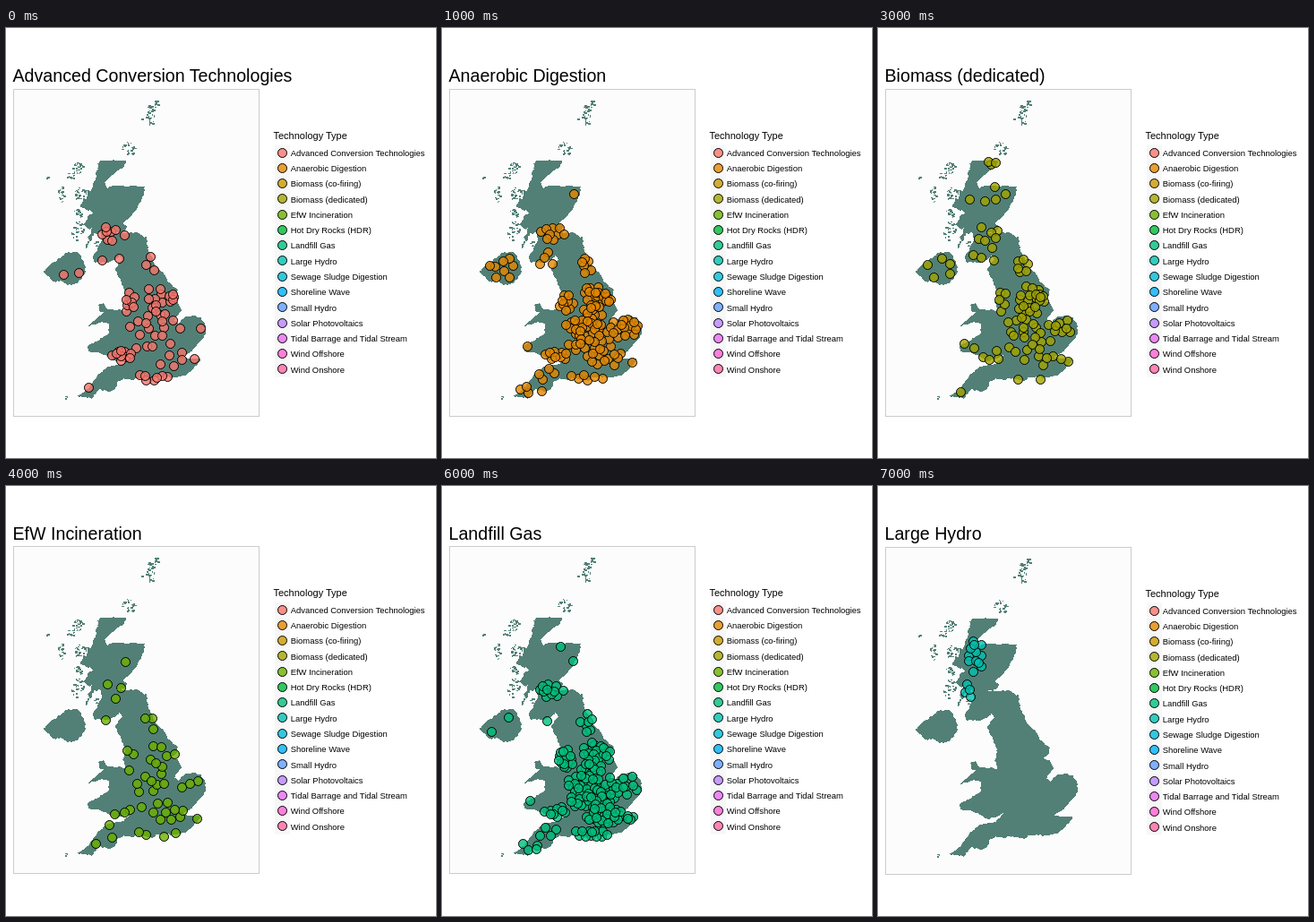
Recreate the animation shown at these times as an HTML page. Size 480 by 480 pixels, loop 8000 ms.

```html
<!DOCTYPE html>
<html lang="en">
<head>
<meta charset="utf-8">
<style>
  html, body { margin: 0; width: 100%; height: 100%; overflow: hidden; background: #fff; }
  svg { display: block; width: 480px; height: 480px; font-family: "Liberation Sans", Arial, sans-serif; }
  .land { fill: #528076; shape-rendering: crispEdges; }
  .dots circle { stroke: #000; stroke-width: 1; fill-opacity: .8; }
</style>
</head>
<body>
<svg viewBox="0 0 480 480">
  <text id="title" x="7.5" y="60" font-size="19.65"></text>
  <g id="plot">
    <rect x="8.5" y="68.5" width="274" height="365" fill="#fcfcfc" stroke="#ccc"/>
    <g id="land" class="land"></g>
    <g id="sites"></g>
    <text x="298.5" y="124" font-size="11">Technology Type</text>
    <g id="legend" class="dots" font-size="9.45"></g>
  </g>
</svg>
<script>
const $ = id => document.getElementById(id);
const STEP = 1000;

const types = [
  ['Advanced Conversion Technologies', '#F8766D'], ['Anaerobic Digestion', '#E58700'],
  ['Biomass (co-firing)', '#C99800'], ['Biomass (dedicated)', '#A3A500'],
  ['EfW Incineration', '#6BB100'], ['Hot Dry Rocks (HDR)', '#00BA38'],
  ['Landfill Gas', '#00BF7D'], ['Large Hydro', '#00C0AF'],
  ['Sewage Sludge Digestion', '#00BCD8'], ['Shoreline Wave', '#00B0F6'],
  ['Small Hydro', '#619CFF'], ['Solar Photovoltaics', '#B983FF'],
  ['Tidal Barrage and Tidal Stream', '#E76BF3'], ['Wind Offshore', '#FD61D1'],
  ['Wind Onshore', '#FF67A4']
];

let seed = 7;
const random = () => (seed = seed * 16807 % 2147483647) / 2147483647;
const spread = r => (random() * 2 - 1) * r;

function inEllipse([cx, cy, rx, ry]) {
  const angle = random() * 2 * Math.PI, r = Math.sqrt(random());
  return [Math.round(cx + rx * r * Math.cos(angle)), Math.round(cy + ry * r * Math.sin(angle))];
}

function add(parent, tag, attrs, text = '') {
  const el = document.createElementNS('http://www.w3.org/2000/svg', tag);
  for (const key in attrs) el.setAttribute(key, attrs[key]);
  el.textContent = text;
  return parent.appendChild(el);
}

// A coast joins a few key points with short, roughened steps.
function coast(rough, text) {
  const points = text.split(/\s+/).map(p => p.split(',').map(Number)), out = [];
  points.forEach(([x, y], i) => {
    const [u, v] = points[(i + 1) % points.length];
    const n = Math.max(1, Math.round(Math.hypot(u - x, v - y) / 2));
    for (let k = 0; k < n; k++)
      out.push([x + (u - x) * k / n + spread(rough), y + (v - y) * k / n + spread(rough)].map(Math.round));
  });
  add($('land'), 'polygon', { points: out.join(' ') });
}

// An archipelago is a scatter of tiny blocks.
function isles(count, ...ellipse) {
  for (let i = 0; i < count; i++) {
    const [x, y] = inEllipse(ellipse);
    add($('land'), 'rect', { x, y, width: 1 + Math.floor(random() * 3), height: 1 + Math.floor(random() * 2) });
  }
}

// Scotland, then its ragged west
coast(.6, `104,148 134,148 132,154 121,162 110,172 112,179 119,176 155,177 154,186 146,202
  136,213 130,218 135,222 131,227 122,229 144,228 152,231 158,238 158,262 131,262 127,253
  122,259 114,262 98,261 97,255 103,244 107,237 101,215 101,170`);
coast(2, '104,150 100,166 92,184 82,200 97,205 86,221 95,224 89,245 97,232 106,225 110,180');

// England and Wales
coast(.7, `156,232 158,245 166,265 176,274 181,283 191,292 190,300 184,304 192,306 196,315
  188,326 193,330 199,323 209,321 218,324 223,333 222,343 211,357 197,368 217,369 215,375
  202,387 192,390 169,390 163,394 150,391 139,393 131,391 125,395 122,403 116,406 104,403
  96,413 79,411 92,402 103,387 113,378 131,375 140,365 130,370 121,372 107,363 93,361
  90,355 106,347 115,341 114,329 107,328 91,333 108,318 115,314 133,315 131,307 133,292
  129,284 122,270 126,263 130,256`);
coast(.8, '103,309 109,308 113,314 110,318 104,317');

// Northern Ireland
coast(.9, '42,273 47,266 56,260 66,251 81,251 88,265 89,273 80,284 69,287 61,282 54,284');

isles(26, 83, 185, 7, 7);
isles(20, 80, 207, 5, 5);
isles(28, 79, 226, 7, 11);
isles(24, 80, 156, 6, 6);
isles(14, 72, 165, 5, 5);
isles(20, 61, 186, 4, 10);
isles(6, 100, 240, 2, 4);
isles(26, 137, 133, 8, 9);
isles(30, 161, 96, 5, 12);
isles(10, 167, 84, 2, 4);
isles(3, 66, 412, 2, 1);
isles(2, 45, 166, 1, 1);
isles(2, 151, 101, 1, 0);

// Regions are ellipses: cx, cy, rx, ry.
const regions = {
  caithness: [128, 151, 7, 3], highlands: [109, 190, 9, 22], grampian: [135, 187, 19, 12],
  clyde: [99, 229, 6, 8], forth: [121, 229, 15, 9], solway: [117, 252, 14, 14],
  ulster: [68, 268, 17, 12], tyne: [161, 264, 7, 11], lancashire: [138, 306, 8, 12],
  yorkshire: [169, 298, 13, 11], humber: [184, 301, 5, 6], trent: [167, 317, 12, 8],
  midlands: [158, 333, 20, 12], fens: [185, 340, 12, 15], norfolk: [207, 335, 12, 11],
  cotswolds: [157, 353, 16, 9], thames: [181, 368, 21, 10], kent: [207, 371, 8, 3],
  severn: [128, 365, 14, 6], wales: [103, 353, 9, 7], south: [166, 389, 24, 4],
  devon: [118, 387, 10, 9], cornwall: [100, 402, 14, 5], peninsula: [93, 403, 6, 3]
};

// Number of sites per region, in the order of the types
const counts = [
  { forth: 8, solway: 2, ulster: 2, tyne: 3, lancashire: 7, yorkshire: 6, humber: 5, trent: 6,
    midlands: 8, fens: 4, norfolk: 1, cotswolds: 3, thames: 5, severn: 10, south: 7, kent: 1, cornwall: 1 },
  { grampian: 1, forth: 9, solway: 4, ulster: 8, tyne: 6, lancashire: 9, yorkshire: 15, humber: 5,
    trent: 10, midlands: 20, fens: 10, norfolk: 11, cotswolds: 9, thames: 13, severn: 9, south: 6,
    kent: 1, devon: 4, cornwall: 4, wales: 1 },
  { forth: 2, ulster: 1, tyne: 1, lancashire: 2, yorkshire: 4, trent: 4, midlands: 3, cotswolds: 1,
    thames: 2, kent: 1, severn: 2 },
  { caithness: 3, highlands: 1, grampian: 4, forth: 6, solway: 4, ulster: 5, tyne: 6, lancashire: 5,
    yorkshire: 10, humber: 4, trent: 8, midlands: 10, fens: 5, norfolk: 7, cotswolds: 4, thames: 6,
    kent: 2, severn: 4, wales: 2, south: 2, cornwall: 1 },
  { grampian: 1, forth: 3, solway: 1, tyne: 3, lancashire: 3, yorkshire: 4, humber: 1, trent: 3,
    midlands: 7, fens: 2, norfolk: 2, cotswolds: 2, thames: 7, kent: 1, severn: 3, south: 4, devon: 2, cornwall: 1 },
  { peninsula: 2 },
  { grampian: 2, forth: 11, solway: 1, ulster: 2, tyne: 7, lancashire: 14, yorkshire: 16, humber: 3,
    trent: 12, midlands: 24, fens: 16, norfolk: 7, cotswolds: 14, thames: 26, kent: 4, severn: 9,
    wales: 1, south: 12, devon: 4, cornwall: 4 },
  { highlands: 12, clyde: 4 }
];

// Of several candidates, keep the one farthest from the sites so far.
function nextSite(sites, region) {
  const gap = ([x, y]) => Math.min(...sites.map(([u, v]) => Math.hypot(u - x, v - y)), 99);
  return Array.from({ length: 6 }, () => inEllipse(region)).reduce((a, b) => gap(b) > gap(a) ? b : a);
}

const layers = counts.map((perRegion, i) => {
  const layer = add($('sites'), 'g', { class: 'dots', fill: types[i][1] }), sites = [];
  for (const name in perRegion)
    for (let k = 0; k < perRegion[name]; k++) sites.push(nextSite(sites, regions[name]));
  for (const [x, y] of sites) add(layer, 'circle', { cx: x + .5, cy: y + .5, r: 5 });
  return layer;
});

types.forEach(([name, fill], i) => {
  const y = 139 + i * 17.28;
  add($('legend'), 'rect', { x: 300, y: y - 8.6, width: 17, height: 17.28, fill: '#f7f7f7' });
  add($('legend'), 'circle', { cx: 308.5, cy: Math.floor(y) + .5, r: 5, fill });
  add($('legend'), 'text', { x: 317.7, y: Math.round(y + 3.8) }, name);
});

let shown = -1;
function draw() {
  const step = Math.floor(performance.now() / STEP) % layers.length;
  if (step !== shown) {
    shown = step;
    const name = types[step][0];
    $('title').textContent = name;
    layers.forEach((layer, i) => layer.setAttribute('display', i === step ? 'inline' : 'none'));
    // A title without descenders is shorter, so the plot sits one pixel higher.
    $('plot').setAttribute('transform', `translate(0 ${/[gjpqy()]/.test(name) ? 0 : -1})`);
  }
  requestAnimationFrame(draw);
}
draw();
</script>
</body>
</html>
```
